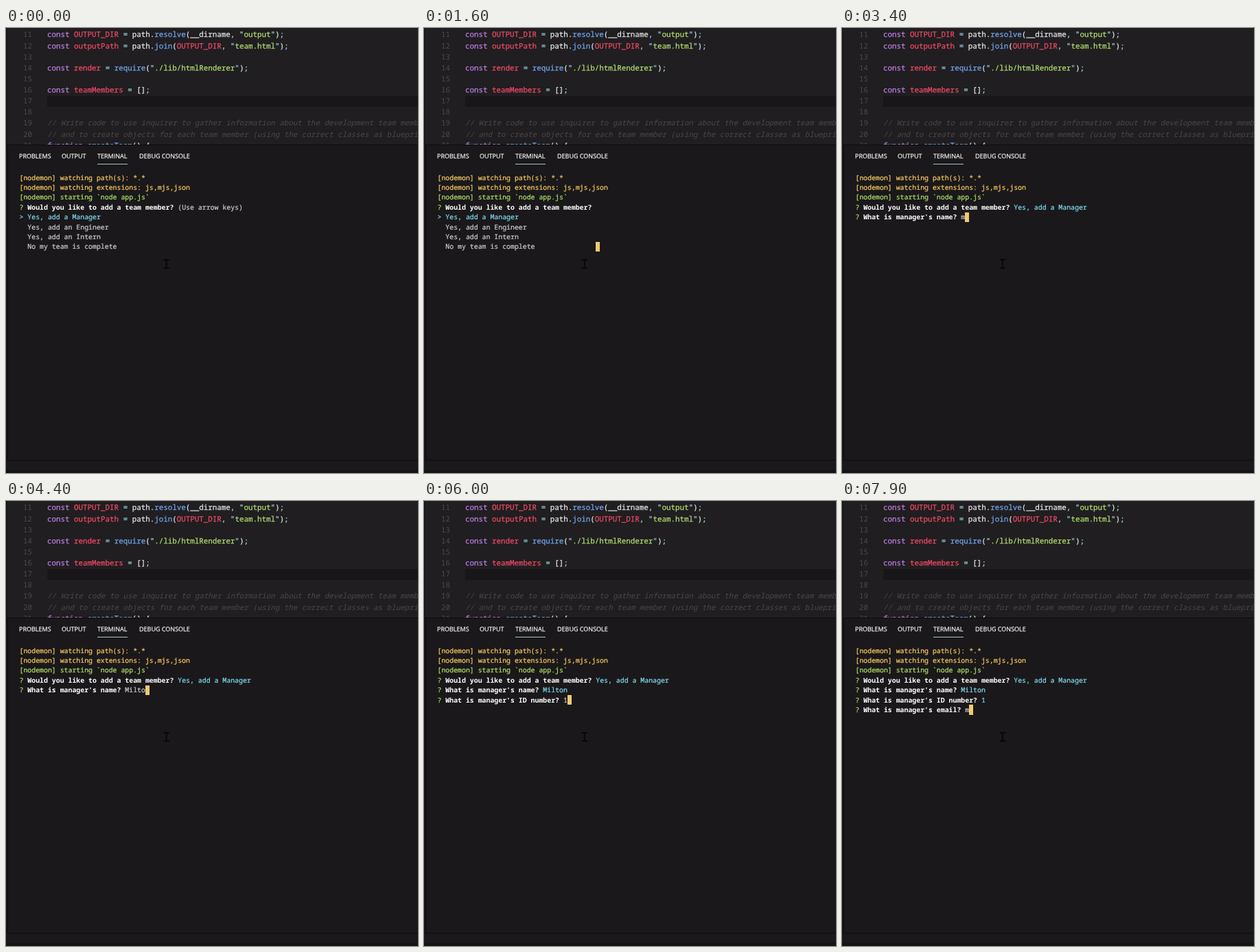
Recreate the animation shown at these times as an HTML page. Size 600x649 px, loop 8 s.

```html
<!DOCTYPE html>
<html lang="en">
<head>
<meta charset="utf-8">
<title>Team prompt in a terminal</title>
<style>
  html, body { margin: 0; width: 100%; height: 100%; overflow: hidden; background: #1a181a; }
  #stage { position: relative; width: 600px; height: 649px; overflow: hidden; text-rendering: geometricPrecision; }
  #stage > * { position: absolute; margin: 0; }
  pre { font-family: "Noto Sans Mono", "DejaVu Sans Mono", monospace; font-variant-ligatures: none; }
  #editor { left: 0; top: 0; width: 600px; height: 170px; background: #201e20; overflow: hidden; }
  #editor > * { position: absolute; margin: 0; }
  #editor pre { top: 2.4px; font-size: 10.85px; line-height: 16.13px; }
  #row { left: 60px; top: 99px; right: 0; height: 16px; background: #181618; }
  #nums { width: 38px; text-align: right; color: #4b494b; }
  #code { left: 60px; color: #e6e8ec; -webkit-text-stroke: 0.25px; }
  .k { color: #bd7ee4; } .v { color: #f04a66; } .f { color: #70a6f0; }
  .s { color: #b2de70; } .o { color: #98d8e6; }
  .c { color: #4a484a; font-style: italic; -webkit-text-stroke: 0; }
  #panel { left: 2px; top: 170px; width: 598px; height: 461px; box-sizing: border-box;
    border: solid #0d0c0d; border-width: 1px 0 1px 1px; background: #1a181a; }
  #edge { left: 0; top: 0; width: 2px; height: 630px; background: #181618; }
  #foot { left: 0; top: 645px; width: 600px; height: 4px; background: #141214; }
  .tab { top: 180px; font: 9px/14px "Open Sans", "Noto Sans", sans-serif; color: #f2f2f2;
    white-space: pre; -webkit-text-stroke: 0.25px; }
  #line { left: 133px; top: 198px; width: 44px; height: 1px; background: #9bcdc5; }
  #term { left: 19.5px; top: 210.6px; font-size: 9.87px; line-height: 14.4px; color: #cecece;
    -webkit-text-stroke: 0.22px; }
  #term b { color: #fff; -webkit-text-stroke: 0; }
  .y { color: #f8cb62; } .g { color: #b0e268; } .a { color: #80daf2; }
  #cursor { width: 6px; height: 14.4px; background: #f0c970; }
</style>
</head>
<body>
<div id="stage">
  <div id="editor">
    <div id="row"></div>
    <pre id="nums"></pre>
    <pre id="code"><span class="k">const</span> <span class="v">OUTPUT_DIR</span> <span class="o">=</span> path.<span class="f">resolve</span>(__dirname<span class="o">, "</span><span class="s">output</span><span class="o">"</span>)<span class="o">;</span>
<span class="k">const</span> <span class="v">outputPath</span> <span class="o">=</span> path.<span class="f">join</span>(<span class="v">OUTPUT_DIR</span><span class="o">, "</span><span class="s">team.html</span><span class="o">"</span>)<span class="o">;</span>

<span class="k">const</span> <span class="v">render</span> <span class="o">=</span> <span class="f">require</span>(<span class="o">"</span><span class="s">./lib/htmlRenderer</span><span class="o">"</span>)<span class="o">;</span>

<span class="k">const</span> <span class="v">teamMembers</span> <span class="o">=</span> []<span class="o">;</span>


<span class="c">// Write code to use inquirer to gather information about the development team members,</span>
<span class="c">// and to create objects for each team member (using the correct classes as blueprints!)</span>
<span class="k">function</span> <span class="f">createTeam</span>() {</pre>
  </div>
  <div id="edge"></div>
  <div id="panel"></div>
  <div id="foot"></div>
  <div class="tab" style="left:19px">PROBLEMS</div>
  <div class="tab" style="left:81px">OUTPUT</div>
  <div class="tab" style="left:133px">TERMINAL</div>
  <div class="tab" style="left:194px">DEBUG CONSOLE</div>
  <div id="line"></div>
  <pre id="term"></pre>
  <div id="cursor"></div>
  <svg style="left:228px;top:336px" width="12" height="16" fill="none" stroke="#080808" stroke-width="2">
    <path d="M1.5 2H10M1.5 14H10M5.8 2V14"/>
  </svg>
</div>
<script>
const $ = id => document.getElementById(id);
const LOOP = 8000, BLINK = 600, COL = 9.87 * 0.6, ROW = 14.4;
const span = (cls, text) => `<span class="${cls}">${text}</span>`;
// Latest [time, value] entry that has happened by t
const latest = (events, t) => events.filter(e => e[0] <= t).pop();

const header = [
  span('y', '[nodemon] watching path(s): *.*'),
  span('y', '[nodemon] watching extensions: js,mjs,json'),
  span('g', '[nodemon] starting `node app.js`')
];
const choices = ['Yes, add a Manager', 'Yes, add an Engineer', 'Yes, add an Intern', 'No my team is complete'];
const picks = [[0, 0], [200, 1], [400, 2], [700, 3], [1000, 2], [1200, 1], [1500, 0]];
const menu = 'Would you like to add a team member?';
const typedName = [...'Milton'].map((_, i) => [3700 + i * 160, 'Milton'.slice(0, i + 1)]);
const prompts = [
  { text: "What is manager's name?", keys: [[2300, ''], [3200, 'm'], [3500, ''], ...typedName], end: 4900 },
  { text: "What is manager's ID number?", keys: [[4900, ''], [5900, '1']], end: 6300 },
  { text: "What is manager's email?", keys: [[6300, ''], [7700, 'm']], end: LOOP }
];

const ask = (text, rest) => `${span('g', '?')} <b>${text}</b> ${rest}`;

function draw(t) {
  const lines = [...header];
  let keyTime, col;
  if (t < prompts[0].keys[0][0]) {
    const [time, pick] = latest(picks, t);
    lines.push(ask(menu, time ? '' : '(Use arrow keys)'));
    choices.forEach((c, i) => lines.push(i === pick ? span('a', '&gt; ' + c) : '  ' + c));
    keyTime = time || -BLINK;
    col = menu.length + 3;
  } else {
    lines.push(ask(menu, span('a', choices[0])));
    for (const { text, keys, end } of prompts) {
      const key = latest(keys, t);
      if (!key) break;
      const [time, value] = key;
      lines.push(ask(text, t >= end ? span('a', value) : value));
      keyTime = time;
      col = text.length + 3 + value.length;
    }
  }
  const html = lines.join('\n');
  if (html !== draw.html) $('term').innerHTML = draw.html = html;
  const cursor = $('cursor').style;
  cursor.left = 19.5 + col * COL + 'px';
  cursor.top = 211 + (lines.length - 1) * ROW + 'px';
  cursor.visibility = Math.floor((t - keyTime) / BLINK) % 2 ? 'hidden' : 'visible';
}

$('nums').textContent = Array.from({ length: 11 }, (_, i) => i + 11).join('\n');
const start = performance.now();
function tick() {
  draw((performance.now() - start) % LOOP);
  requestAnimationFrame(tick);
}
tick();
</script>
</body>
</html>
```
